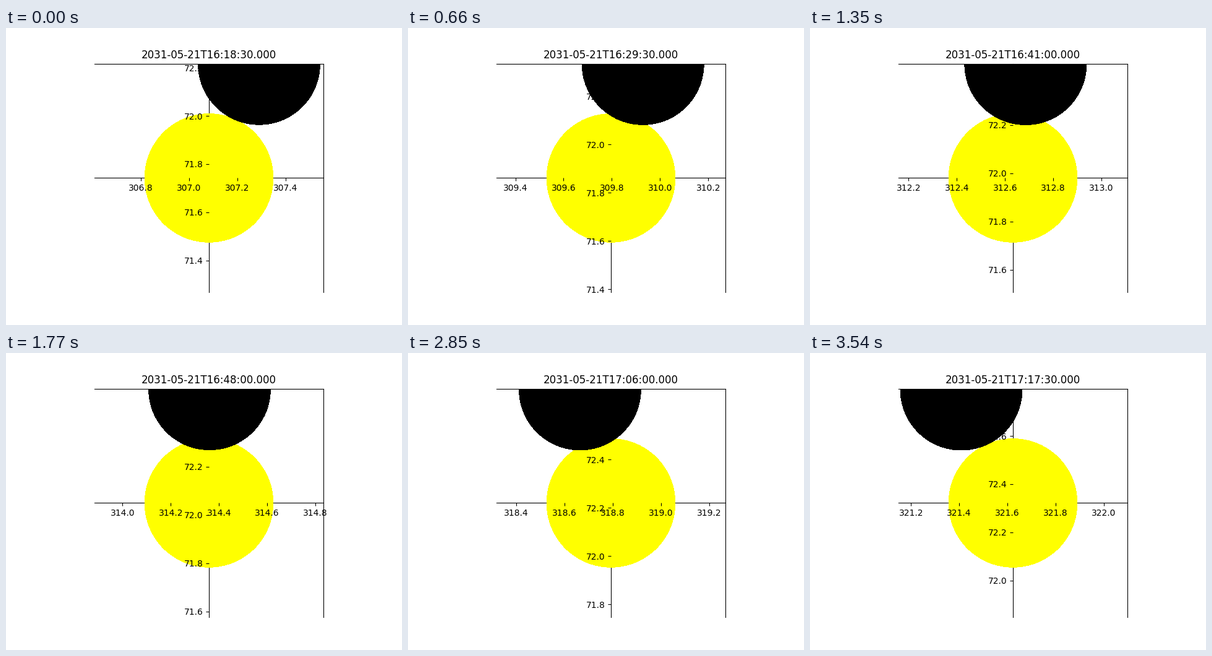
These frames come from a looping animation (640 px wide and 480 px high, 3570 ms). A matplotlib script:

```python
import matplotlib.pyplot as plt
from matplotlib.animation import FuncAnimation
from matplotlib.patches import Circle
from matplotlib.ticker import FormatStrFormatter, MultipleLocator

FRAMES = 119
INTERVAL = 30          # ms
STEP = 30              # simulated seconds per frame
START = 16 * 3600 + 18 * 60 + 30
SCALE = 389.6          # pixels per degree
HALF = 184.8 / SCALE   # half width of the view, degrees
SUN_RADIUS = 103.8 / SCALE
MOON_RADIUS = 98.5 / SCALE


def sun_position(u):
    """Sun in degrees; u runs from -1 to 1 over the loop."""
    x = 314.3582 + 7.2705 * u - 0.0058 * u**2
    y = 72.0501 + 0.2898 * u - 0.0180 * u**2
    return x, y


def moon_offset(u):
    """Moon relative to the sun, in degrees."""
    dx = 1.0 - 82.25 * u - 2.25 * u**2
    dy = 184.3 - 0.4 * u
    return dx / SCALE, dy / SCALE


def timestamp(i):
    minutes, s = divmod(START + STEP * i, 60)
    h, m = divmod(minutes, 60)
    return f"2031-05-21T{h:02d}:{m:02d}:{s:02d}.000"


def add_disc(radius, color, zorder):
    disc = Circle((0, 0), radius, fc=color, ec="none", zorder=zorder,
                  antialiased=False)
    return ax.add_patch(disc)


fig, ax = plt.subplots(figsize=(6.4, 4.8), dpi=100)
ax.set_aspect("equal")
for side in ("left", "bottom"):
    ax.spines[side].set_position("center")
for spine in ax.spines.values():
    spine.set_zorder(0.5)
for axis in (ax.xaxis, ax.yaxis):
    axis.set_major_locator(MultipleLocator(0.2))
    axis.set_major_formatter(FormatStrFormatter("%.1f"))

# The sun lies below the ticks and labels, the moon above them
sun = add_disc(SUN_RADIUS, "yellow", 1)
moon = add_disc(MOON_RADIUS, "black", 2)
title = ax.set_title("")


def update(i):
    u = 2 * i / (FRAMES - 1) - 1
    x, y = sun_position(u)
    dx, dy = moon_offset(u)
    sun.center = x, y
    moon.center = x + dx, y + dy
    ax.set_xlim(x - HALF, x + HALF)
    ax.set_ylim(y - HALF, y + HALF)
    title.set_text(timestamp(i))
    return sun, moon, title


anim = FuncAnimation(fig, update, frames=FRAMES, interval=INTERVAL,
                     repeat=True, repeat_delay=0, blit=False)
plt.show()
```
